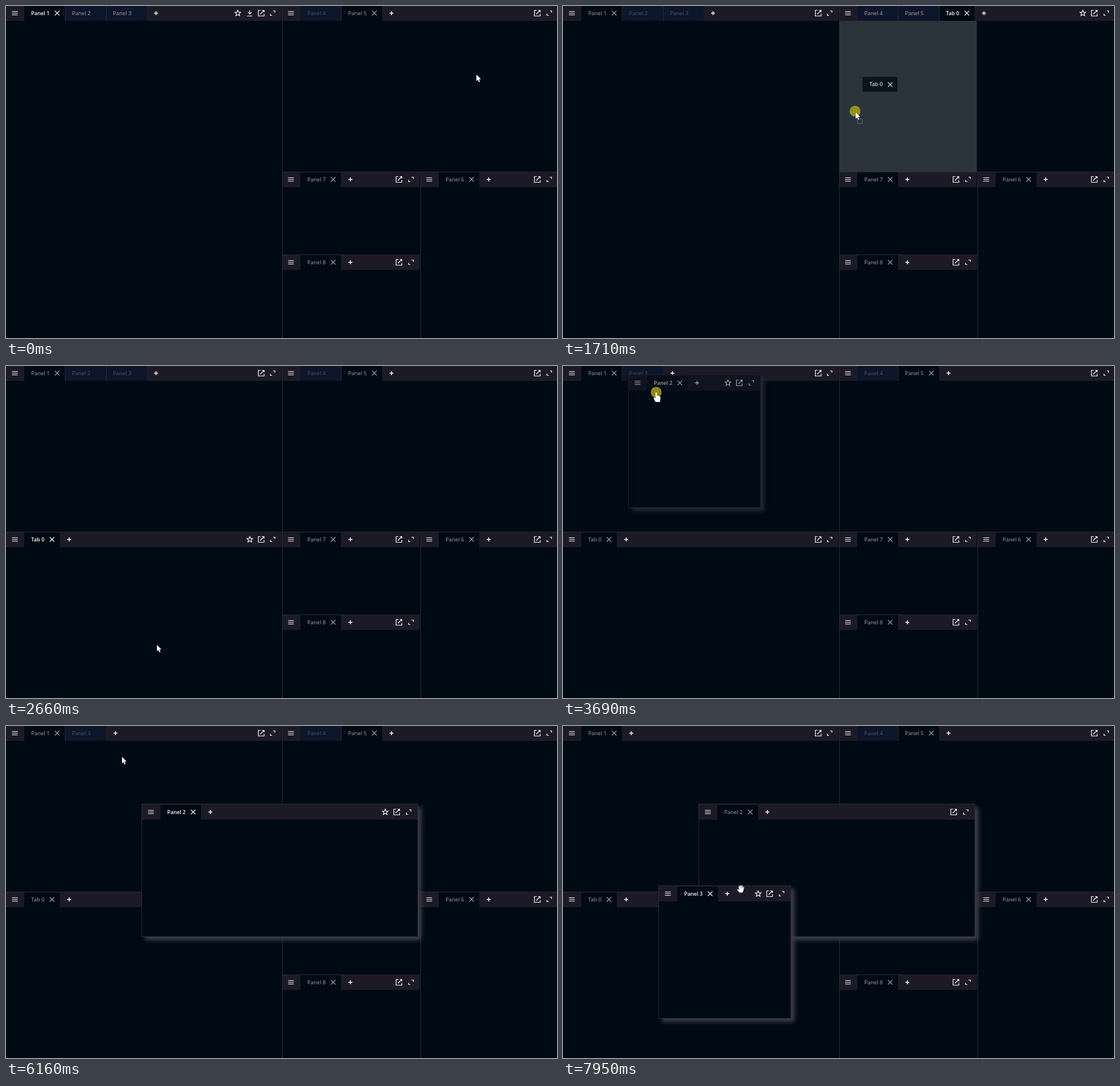
These frames come from a looping animation (964 by 581 pixels, 8000 ms). An HTML page with a canvas:

```html
<!DOCTYPE html>
<html>
<head>
<meta charset="utf-8">
<title>Docking panels</title>
<style>
html, body { margin: 0; width: 100%; height: 100%; overflow: hidden; background: #000a14; }
canvas { display: block; }
</style>
</head>
<body>
<canvas id="stage" width="964" height="581"></canvas>
<script>
const c = document.getElementById('stage').getContext('2d');
const BODY = '#000a14', BAR = '#1d1a27', TAB = '#0d162a', LINE = '#2a2939';
const BRIGHT = '#fff', MEDIUM = '#a5a3ad', DIM = '#53526a';
const FAMILY = '"Open Sans", "Noto Sans", sans-serif';
const LOOP = 8000, STEP = 70;

// Moments at which the layout changes
const ADD = 960, DROP = 2660, LIFT_A = 3540, RELEASE_A = 4240, RESIZE = 5140, LIFT_B = 6710, RELEASE_B = 7460;

const linear = f => f;
const smooth = f => f * f * (3 - 2 * f);
const easeIn = k => f => f ** k;
const easeOut = k => f => 1 - (1 - f) ** k;

// One row per pointer move; a pressed button is held until the next row
const move = (start, end, x, y, ease, cursor, pressed) => ({ start, end, x, y, ease, cursor, pressed });
const MOVES = [
  move(0, 0, 823, 120, linear, 'arrow'),
  move(70, 760, 670, 9, smooth, 'arrow'),
  move(ADD, 1710, 512, 186, easeIn(3.4), 'arrow', true),
  move(1780, 1990, 313, 465, easeOut(2.5), 'arrow', true),
  move(1990, 2270, 264, 488, easeOut(2), 'arrow', true),
  move(DROP, 3290, 140, 15, smooth, 'arrow'),
  move(LIFT_A, 3690, 163, 46, easeIn(1.2), 'hand', true),
  move(3690, 4040, 274, 151, easeOut(1.5), 'hand', true),
  move(RELEASE_A, 4940, 468, 183, smooth, 'arrow'),
  move(RESIZE, 5680, 720, 183, smooth, 'resize', true),
  move(5950, 6160, 203, 54, smooth, 'arrow'),
  move(6160, 6640, 140, 15, easeOut(2), 'arrow'),
  move(LIFT_B, 7260, 204, 294, smooth, 'hand', true),
  move(RELEASE_B, 7950, 311, 285, smooth, 'grab')
];

const ICONS = {
  menu: 'M-5-3H5M-5 0H5M-5 3H5',
  close: 'M-4-4L4 4M4-4L-4 4',
  plus: 'M-3.5 0H3.5M0-3.5V3.5',
  full: 'M1-4H4V-1M-4 1V4H-1',
  popout: 'M-1-5H-5V5H5V1M1.5-5H5V-1.5M5-5L-2 2',
  star: 'M0-5L1.5-1.6 5-1.4 2.3 .9 3.2 4.5 0 2.6-3.2 4.5-2.3 .9-5-1.4-1.5-1.6Z',
  download: 'M0-5V1M-3-1.5L0 1.5 3-1.5M-4.5 5H4.5'
};
const CURSORS = {
  arrow: 'M0 0V11.5L2.6 9 4.4 13.2 6.2 12.4 4.4 8.3H8Z',
  hand: 'M-1.4 1Q0-.8 1.4 1V5.5L6 6.8Q8 7.5 7.6 10L6.5 17H-1L-4.4 11Q-4.8 9-3 9.2L-1.4 10.5Z',
  grab: 'M-3-5L-1.5-5.5-.5-1V-6.5H1V-1L2-6H3.5V0L4.6-3.5 6-3 4.5 3.5 3 6.5H-2.5L-6 1.5-5 0-2.5 2-4-3.5Z',
  resize: 'M-8 0L-5-3V-.7H5V-3L8 0 5 3V.7H-5V3Z'
};

const moveAt = t => MOVES.findLastIndex(m => t >= m.start);

// Motion advances in whole steps and always reaches the end of a move
function snap(t) {
  const { start, end } = MOVES[moveAt(t)];
  return t >= end ? t : start + STEP * Math.floor((t - start) / STEP);
}

function pointerAt(t) {
  const i = moveAt(t), to = MOVES[i], from = MOVES[Math.max(0, i - 1)];
  const f = t >= to.end ? 1 : to.ease((t - to.start) / (to.end - to.start));
  return [from.x + (to.x - from.x) * f, from.y + (to.y - from.y) * f];
}

// A dragged thing hangs one step behind the pointer
function dragged(t, dx, dy) {
  const [x, y] = pointerAt(t - STEP);
  return [Math.round(x - dx), Math.round(y - dy)];
}

function rect(x, y, w, h, color) {
  c.fillStyle = color;
  c.fillRect(x, y, w, h);
}

// Icons sit on pixel centres to keep their strokes crisp
function icon(name, x, y, color = BRIGHT, width = 1.2) {
  c.save();
  c.translate(Math.floor(x) + 0.5, Math.floor(y) + 0.5);
  c.strokeStyle = color;
  c.lineWidth = width;
  c.stroke(new Path2D(ICONS[name]));
  c.restore();
}

function label(text, x, y, color) {
  c.font = (color === BRIGHT ? '600 9.2px ' : '9.5px ') + FAMILY;
  c.fillStyle = color;
  c.fillText(text, x, y);
}

// A tab bar; extra icons appear only while its group has the focus
function group(x, y, right, tabs, active, focus, extra = ['star']) {
  const mid = y + 12.5;
  rect(x - 1, y, right - x + 1, 26, BAR);
  icon('menu', x + 14.5, mid, BRIGHT, 1);
  let tx = x + 31;
  for (const name of tabs) {
    const on = name === active, w = name.startsWith('Tab') ? 62.5 : 71.5;
    const color = on ? (focus ? BRIGHT : MEDIUM) : focus ? MEDIUM : DIM;
    const left = Math.floor(tx);
    rect(left, y, Math.floor(tx + w) - left, 26, on ? BODY : TAB);
    if (name !== tabs[0]) rect(left, y, 1, 26, LINE);
    label(name, tx + 12, y + 16.2, color);
    if (on) icon('close', tx + w - 14, mid, color, 1.1);
    tx += w;
  }
  icon('plus', tx + 16, mid, BRIGHT, 1.4);
  const tools = ['full', 'popout', ...(focus ? extra : [])];
  tools.forEach((name, i) => icon(name, right - 16 - 20.25 * i, mid));
}

function floating(x, y, right, name, focus, dragging) {
  const w = Math.round(right) - x, h = 233;
  c.save();
  c.globalAlpha = dragging ? 0.6 : 1;
  c.shadowColor = '#3b3c47';
  c.shadowBlur = 7;
  c.shadowOffsetX = c.shadowOffsetY = 6;
  rect(x, y, w, h, BODY);
  c.shadowColor = 'transparent';
  c.globalAlpha = dragging ? 0.85 : 1;
  rect(x, y, w, h, BODY);
  c.globalAlpha = dragging ? 0.6 : 1;
  group(x + 2, y + 2, x + w - 1, [name], name, focus);
  rect(x + 1, y + 1, w - 2, 1, BAR);
  c.strokeStyle = LINE;
  c.lineWidth = 1;
  c.strokeRect(x + 0.5, y + 0.5, w - 1, h - 1);
  c.restore();
}

// Highlights the half of a panel near the pointer, or all of it
function dropZone(px, py) {
  let [x, y, w, h] = px < 483 ? [0, 26, 483, 555] : [484, 26, 480, 264];
  const u = (px - x) / w, v = (py - y) / h;
  if (u < 0.2) w /= 2;
  else if (u > 0.8) { x += w / 2; w /= 2; }
  else if (v < 0.2) h /= 2;
  else if (v > 0.8) { y += h / 2; h /= 2; }
  rect(x, y, w, h, '#2b343b');
}

function ghost(t) {
  const [x, y] = dragged(t, 32, 12);
  c.save();
  c.globalAlpha = 0.82;
  rect(x, y, 61, 26, '#030e17');
  label('Tab 0', x + 12, y + 16.2, BRIGHT);
  icon('close', x + 48.5, y + 13);
  c.restore();
}

function pointer(t, x, y, dropping) {
  const i = moveAt(t), { end, pressed } = MOVES[i];
  const { cursor } = t >= end && MOVES[i + 1] || MOVES[i];
  if (pressed) {
    c.fillStyle = 'rgba(178,174,22,.78)';
    c.beginPath();
    c.arc(x - (dropping ? 1 : 0), y - (dropping ? 2 : 0), 9.5, 0, 7);
    c.fill();
  }
  c.save();
  c.translate(x, y);
  const shape = new Path2D(CURSORS[cursor]);
  c.lineWidth = 0.6;
  c.strokeStyle = '#111';
  if (cursor !== 'resize') c.stroke(shape);
  c.fillStyle = cursor === 'resize' ? '#f4f28a' : '#fff';
  c.fill(shape);
  if (dropping) {
    c.strokeStyle = '#8b9196';
    c.lineWidth = 1;
    c.setLineDash([1, 1]);
    c.strokeRect(3.5, 11.5, 8, 8);
  }
  c.restore();
}

function draw(t) {
  const added = t >= ADD && t < DROP, floatA = t >= LIFT_A, floatB = t >= LIFT_B;
  const [px, py] = pointerAt(t);
  const dropping = added && py > 26;

  rect(0, 0, 964, 581, BODY);
  const leftTabs = ['Panel 1', ...(floatA ? [] : ['Panel 2']), ...(floatB ? [] : ['Panel 3'])];
  group(1, 0, 482.5, leftTabs, 'Panel 1', t < ADD, ['download', 'star']);
  group(484, 0, 966, ['Panel 4', 'Panel 5', ...(added ? ['Tab 0'] : [])], added ? 'Tab 0' : 'Panel 5', added);
  group(484, 291, 724, ['Panel 7'], 'Panel 7');
  group(726, 291, 966, ['Panel 6'], 'Panel 6');
  group(484, 436, 724, ['Panel 8'], 'Panel 8');
  if (t >= DROP) {
    group(1, 291, 482.5, ['Tab 0'], 'Tab 0', !floatA);
    rect(0, 290, 483, 1, LINE);
  }
  rect(483, 290, 481, 1, LINE);
  rect(483, 435, 242, 1, LINE);
  rect(483, 0, 1, 581, LINE);
  rect(725, 290, 1, 291, LINE);

  if (dropping) {
    dropZone(px, py);
    ghost(t);
  }
  if (floatA) {
    const [x, y] = dragged(Math.min(t, RELEASE_A), 37, 15);
    const right = t < RESIZE ? x + 232 : pointerAt(Math.min(t, 5680))[0] + 1;
    floating(x, y, right, 'Panel 2', !floatB, t < RELEASE_A);
  }
  if (floatB) {
    const [x, y] = dragged(Math.min(t, RELEASE_B), 37, 15);
    floating(x, y, x + 232, 'Panel 3', true, t < RELEASE_B);
  }
  pointer(t, px, py, dropping);
}

function frame() {
  draw(snap(performance.now() % LOOP));
  requestAnimationFrame(frame);
}
frame();
</script>
</body>
</html>
```
